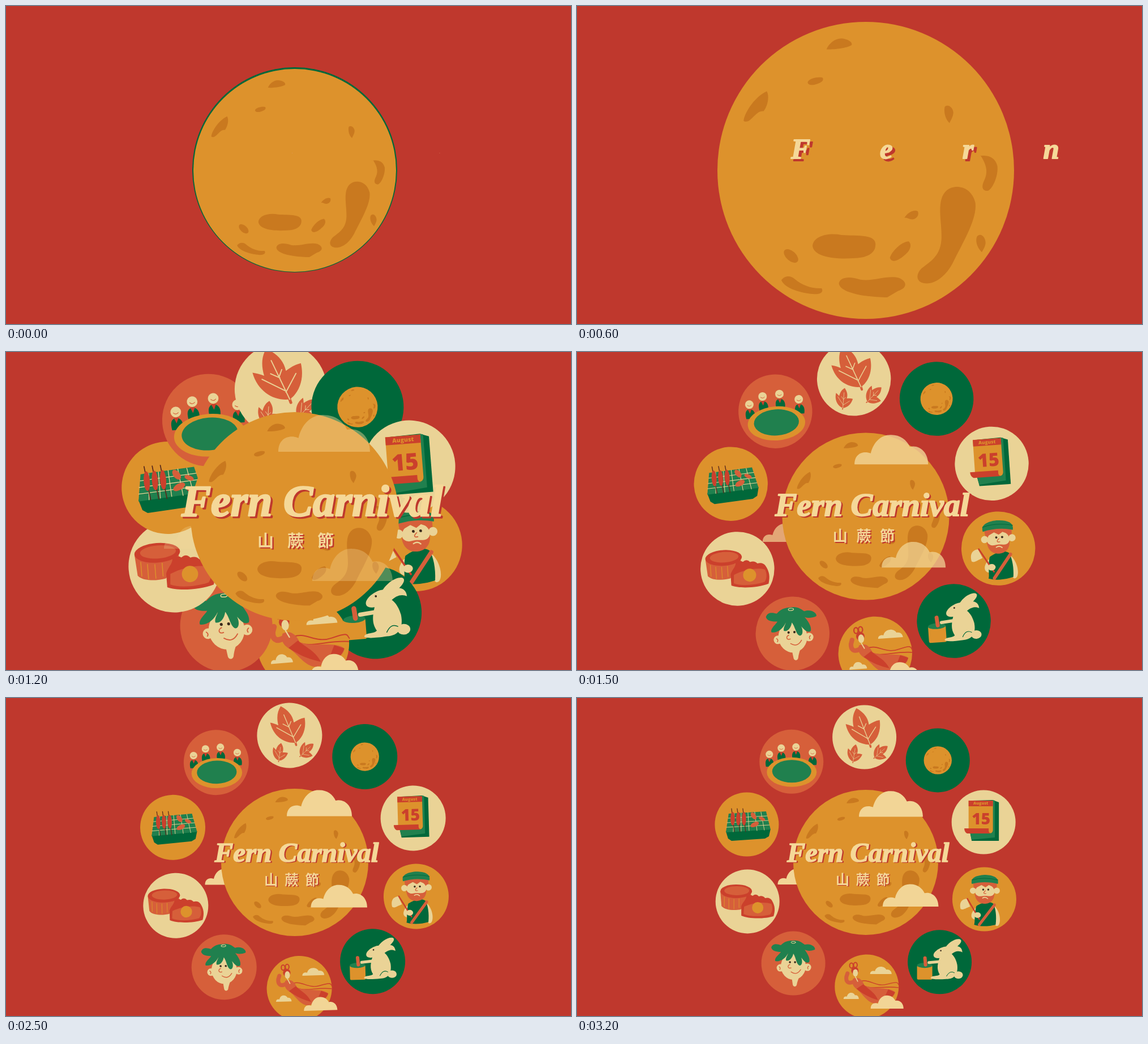
Animation of 998x561 px, one loop 3.3 s. Source, as an HTML page:

```html
<!DOCTYPE html>
<html lang="en">
<head>
<meta charset="utf-8">
<title>Fern Carnival</title>
<style>
  :root { --bg: #bf382d; --cream: #ead396; --orange: #dd922c; --dark: #00683a; --leaf: #20804e; --red: #cb402c; --coral: #d65f3a; }
  html, body { margin: 0; width: 100%; height: 100%; overflow: hidden; background: var(--bg); }
  svg { display: block; width: 100%; height: 100%; }
  .c { fill: var(--cream); } .o { fill: var(--orange); } .d { fill: var(--dark); }
  .l { fill: var(--leaf); } .r { fill: var(--red); } .k { fill: var(--coral); }
  .ln { fill: none; stroke-linecap: round; stroke-linejoin: round; }
  .sc { stroke: var(--cream); } .so { stroke: var(--orange); } .sd { stroke: var(--dark); }
  .sr { stroke: var(--red); } .sk { stroke: var(--coral); }
  .ink { fill: #3a2a1c; }
  .crater { fill: #c9791f; }
  .cloud { fill: #f2d596; }
  .word { font-family: "Liberation Serif", "Times New Roman", serif; font-weight: 700; font-style: italic; stroke-width: .035em; stroke-linejoin: round; white-space: pre; }
  .sub { font-family: "Noto Sans CJK TC", "Noto Sans CJK JP", "Noto Sans CJK", sans-serif; font-weight: 700; }
  .face { fill: #f5d898; stroke: #f5d898; }
  .shade { fill: var(--bg); stroke: var(--bg); }
  .sub text { stroke: none; }
  .num { font-family: "Open Sans", "Noto Sans", sans-serif; font-weight: 800; text-anchor: middle; }
</style>
</head>
<body>
<svg viewBox="0 0 998 561" preserveAspectRatio="none">
  <defs>
    <g id="moonArt">
      <circle class="o" cx="510" cy="290" r="276"/>
      <g class="crater">
        <path d="M437 65C442 53 456 41 472 46C480 48 485 52 484 57C478 62 452 66 437 65Z"/>
        <path d="M402 126C404 119 424 115 430 118C433 125 424 128 414 131C406 132 402 130 402 126Z"/>
        <path d="M283 196C286 180 305 152 326 143C331 152 328 170 320 180C308 178 300 195 290 199C285 200 282 199 283 196Z"/>
        <path d="M657 172C662 166 672 172 673 182C673 190 668 197 666 202C658 195 655 182 657 172Z"/>
        <path d="M717 264C730 261 750 261 755 282C757 300 746 325 737 328C728 328 725 322 729 312C738 295 736 282 724 263Z"/>
        <path d="M661 327C675 315 706 318 714 350C718 380 690 425 672 462C660 485 640 502 620 500C604 498 602 484 614 472C632 458 650 448 651 415C652 385 640 345 661 327Z"/>
        <path d="M717 413C724 405 733 414 733 425C732 433 728 438 726 442C716 432 714 420 717 413Z"/>
        <path d="M582 378C588 368 600 362 607 366C610 374 604 380 597 381C590 381 588 377 582 378Z"/>
        <path d="M411 430C413 412 440 405 465 410C490 412 525 408 528 425C530 443 515 452 490 453C450 456 413 450 411 430Z"/>
        <path d="M555 452C562 435 580 422 590 422C597 428 592 440 585 445C575 455 558 465 555 452Z"/>
        <ellipse cx="371" cy="449" rx="16" ry="9" transform="rotate(42 371 449)"/>
        <path d="M353 494C358 486 370 484 378 492C392 504 410 510 428 509C432 516 426 520 415 520C390 518 360 510 353 494Z"/>
        <path d="M460 500C462 488 480 486 500 493C525 497 550 484 572 490C590 498 585 510 570 514L550 526C520 526 462 520 460 500Z"/>
      </g>
    </g>
    <path id="puff" d="M0 0C0-15 12-19 22-15C26-32 38-41 50-40C62-40 71-33 75-24C88-27 100-17 100 0Z"/>
    <g id="leafArt">
      <path class="k" d="M10 13C-8 14-28 2-33-23C-28-22-23-20-19-18C-22-32-20-42-14-51C-2-44 6-36 8-22C14-26 20-29 27-30C30-10 22 6 10 13Z"/>
      <path class="ln sk" stroke-width="3.5" d="M9 10L11 17"/>
      <path class="ln sc" stroke-width="1.3" d="M10 13L-9-36M5 2L-22-14M6 4L20-18M0-14L-11-20M-1-15L3-24"/>
    </g>
    <g id="guest">
      <path class="d" d="M-6 22C-8 12-6 8 0 7C6 8 9 13 7 22Z"/>
      <path class="r" d="M-3 7H3L0 14Z"/>
      <circle class="c" r="6.5"/>
      <path class="ln sk" stroke-width=".8" d="M-3 1Q0 4 3 1"/>
    </g>
  </defs>

  <g id="ring">
    <!-- axeman -->
    <g class="bubble"><circle class="o" r="56.5"/>
      <path class="c" d="M-16 16C-24 24-26 34-16 36L-8 32L-6 14ZM18 12C28 22 30 40 25 46C20 50 18 44 18 38Z"/>
      <path class="d" d="M-14 12C-18 25-16 40-18 45C-6 49 8 48 20 45C22 30 20 16 16 8C8 2-4 6-14 12Z"/>
      <path class="ln sk" stroke-width="5" stroke-linecap="butt" d="M18 10L-9 45"/>
      <path class="c" d="M-31-1C-42 0-44 8-42 17C-38 20-34 16-25 13Z"/>
      <path class="ln sr" stroke-width="2.4" d="M-30-1L-9 35"/>
      <ellipse class="c" cx="-12" cy="28" rx="6" ry="5"/>
      <path class="k" d="M-20-30H22V-16H-18Z"/>
      <g class="c"><circle cx="-20" cy="-15" r="5.5"/><circle cx="22" cy="-15" r="5.5"/><ellipse cx="1" cy="-13" rx="17" ry="14"/></g>
      <path class="k" d="M-17-11C-10-2-6-6 1-6C8-6 14-3 18-11C18 4 8 8 1 8C-7 8-16 4-17-11ZM-18-29H20L15-22L8-25L2-21L-5-25L-13-21Z"/>
      <path class="ln sc" stroke-width="1.6" d="M-3-2Q2-5 6-1"/>
      <g class="ink"><circle cx="-2" cy="-17" r="1.7"/><circle cx="7" cy="-17" r="1.7"/></g>
      <path class="ln sk" stroke-width="1.2" d="M2-15C-2-12-2-9 3-10"/>
      <path class="l" d="M-22-27C-25-38-14-42 0-43C14-43 27-39 24-27C10-31-8-31-22-27Z"/>
      <path class="ln sd" stroke-width="1" d="M-22-34Q0-40 24-34"/>
    </g>
    <!-- rabbit -->
    <g class="bubble"><circle class="d" r="56.5"/>
      <rect class="o" x="-40" y="6" width="27" height="25" rx="2"/>
      <ellipse class="l" cx="-26.5" cy="6" rx="13.5" ry="4.5"/>
      <path class="ln sk" stroke-width="6" d="M-26-7L-25 5"/>
      <g class="c">
        <path d="M8-22C14-34 28-42 36-40C42-37 34-28 18-18ZM14-20C24-32 40-30 40-17C35-20 27-20 19-12Z"/>
        <ellipse cx="5" cy="-17" rx="17" ry="8.5" transform="rotate(-24 5 -17)"/>
        <path d="M2-14C18-24 28-10 31 5C33 22 26 30 12 30C-2 31-14 31-16 28C-14 23-4 26 0 22C-6 12-4 2 2-14Z"/>
        <ellipse cx="33" cy="23" rx="8" ry="6.5"/>
      </g>
      <path class="ln sc" stroke-width="5" d="M4-1L-19 1"/>
      <circle class="ink" cx="2" cy="-20" r="1.3"/>
      <path class="ln sd" stroke-width="1" d="M12 25Q18 14 26 19"/>
    </g>
    <!-- flying lady -->
    <g class="bubble"><circle class="o" r="56.5"/>
      <use href="#puff" class="c" transform="translate(6 -22) scale(.38 .32)"/>
      <use href="#puff" class="c" transform="translate(-41 22) scale(.27)"/>
      <path class="ln sr" stroke-width="1.4" d="M-14-8C4-16 14 2 36-4S54-6 57-2M-10-4C8 8 26-2 56 2"/>
      <path class="ln sk" stroke-width="7" d="M-24-8C-33-4-37-9-36-17L-34-23"/>
      <path class="k" d="M-24-14C-14-18-8-12-4-2C10 6 40 0 50 10C48 22 30 26 14 30C0 28-6 14-16 6C-22 2-28-4-24-14Z"/>
      <path class="r" d="M-18 4L-6-4C4 6 14 10 20 24C6 20-6 14-18 4ZM38 5L50 10C46 20 38 22 28 26Z"/>
      <circle class="r" cx="-21" cy="-28" r="6.5"/>
      <ellipse class="c" cx="-20" cy="-24" rx="4.5" ry="6.5"/>
      <g class="ln sr" stroke-width="2"><ellipse cx="-27" cy="-37" rx="3.2" ry="4.5"/><ellipse cx="-20" cy="-38" rx="3.2" ry="4.5"/></g>
      <path class="ln sc" stroke-width="1.6" d="M-20-17L-16-9"/>
      <use href="#puff" class="cloud" transform="translate(7 39) scale(.58)"/>
    </g>
    <!-- boy with pomelo hat -->
    <g class="bubble"><circle class="k" r="56.5"/>
      <g class="c">
        <path d="M-3 24L-1 38C0 42 5 42 6 38C7 32 9 28 11 22Z"/>
        <circle cx="-23" cy="8" r="6.5"/><circle cx="25" cy="7" r="6.5"/>
        <ellipse cx="0" cy="5" rx="22" ry="24"/>
      </g>
      <path class="ln sk" stroke-width="1.3" d="M-25 6Q-22 8-24 11M27 5Q24 7 26 10M-6 2C-11 4-10 10-4 8M-4 15Q6 22 13 11"/>
      <g class="ink"><circle cx="-6" cy="-2" r="1.8"/><circle cx="3" cy="-2" r="1.8"/></g>
      <path class="l" d="M-2-40C10-42 16-36 20-33C32-36 40-28 38-24C30-21 24-22 20-24C26-16 30-8 28-2C22 1 18-5 14-10C17-2 15 4 11 4C5 2 5-10 0-17C-2-8-8-3-13-5C-14-10-10-14-9-18C-14-8-24-2-32-4C-34-10-24-16-22-20C-30-20-38-22-39-28C-36-36-28-34-22-32C-16-38-10-40-2-40Z"/>
      <ellipse class="ln sc" cx="0" cy="-37" rx="4" ry="1.8" stroke-width="1"/>
    </g>
    <!-- cakes -->
    <g class="bubble"><circle class="c" r="56.5"/>
      <path class="k" d="M-48-18L-46 8C-40 16-22 16-12 14L6-2V-18Z"/>
      <path class="ln so" stroke-width="1" d="M-41-8V9M-33-5V13M-24-4V13M-15-5V11"/>
      <ellipse class="r" cx="-20" cy="-18" rx="28" ry="12"/>
      <ellipse class="k" cx="-19" cy="-19" rx="22" ry="8"/>
      <path class="r" d="M-11 8C-8 0-3-2-2-9Q4-14 9-10Q15-15 20-9Q27-11 31-6Q39-8 43-2C49 8 49 16 46 26C30 31 2 31-11 25Z"/>
      <path class="k" d="M-6 9C10 2 30 0 42 4C45 11 44 18 40 23C24 27 4 27-7 22Z"/>
      <circle class="o" cx="18" cy="11" r="10"/>
    </g>
    <!-- grill -->
    <g class="bubble"><circle class="o" r="56.5"/>
      <path class="d" d="M-37 12L42 8L39 21L32 25L-27 29L-33 25Z"/>
      <path class="l" d="M-32-19L34-23L42 9L-37 14Z"/>
      <path class="ln sc" stroke-width=".9" d="M-33-11L36-15M-35-3L38-7M-36 5L40 1M-22-19L-24 13M-10-20L-10 12M2-21L4 11M14-22L18 11M25-22L31 10"/>
      <path class="ln" stroke="#5a2a1c" stroke-width="1.2" d="M-27-28L-22 13M-17-28L-12 13M-7-28L-2 13"/>
      <g class="r"><ellipse cx="-25" cy="-10" rx="3.8" ry="12"/><ellipse cx="-15" cy="-10" rx="3.8" ry="12"/><ellipse cx="-5" cy="-10" rx="3.8" ry="12"/></g>
      <g class="k"><ellipse cx="12" cy="-15" rx="4" ry="7" transform="rotate(-35 12 -15)"/><ellipse cx="14" cy="0" rx="8" ry="4" transform="rotate(-25 14 0)"/><ellipse cx="27" cy="-10" rx="6" ry="3" transform="rotate(25 27 -10)"/></g>
    </g>
    <!-- dinner table -->
    <g class="bubble"><circle class="k" r="56.5"/>
      <use href="#guest" transform="translate(-39 -13)"/><use href="#guest" transform="translate(-18 -24)"/>
      <use href="#guest" transform="translate(8 -26)"/><use href="#guest" transform="translate(37 -16)"/>
      <ellipse class="o" cx=".5" cy="18.5" rx="44" ry="26"/>
      <ellipse class="l" cx=".5" cy="17" rx="34.5" ry="20"/>
    </g>
    <!-- leaves -->
    <g class="bubble"><circle class="c" r="56.5"/>
      <use href="#leafArt"/>
      <use href="#leafArt" transform="translate(-21 36) rotate(30) scale(.45)"/>
      <use href="#leafArt" transform="translate(22 30) rotate(69) scale(.45)"/>
    </g>
    <!-- little moon -->
    <g class="bubble"><circle class="d" r="56.5"/>
      <use href="#moonArt" transform="scale(.0895) translate(-510 -290)"/>
    </g>
    <!-- calendar -->
    <g class="bubble"><circle class="c" r="56.5"/>
      <path class="d" d="M-20-38L16-39L27-35V33H-21L-24 18Z"/>
      <path class="l" d="M16-39L20-38V27L-21 31L-24 18H16Z"/>
      <path class="o" d="M-26.5-38H16.5V14C16 20 12 20 8 19L-26.5 12Z"/>
      <path class="r" d="M-26.5-38H16.5V-28H-26.5ZM-34 11H9V15C9 18 11 20 14 20H-29C-33 18-34 14-34 11Z"/>
      <text class="num o" x="-5" y="-30.6" font-size="7.2">August</text>
      <text class="num r" x="-4.5" y="4" font-size="28">15</text>
    </g>
  </g>

  <use id="cloudBack" href="#puff" class="cloud"/>
  <circle id="rim" class="d" cx="510" cy="289" r="181"/>
  <use id="moon" href="#moonArt"/>
  <use id="cloudTop" href="#puff" class="cloud"/>
  <use id="cloudLow" href="#puff" class="cloud"/>
  <g id="title" class="word"><text class="shade">Fern Carnival</text><text class="face">Fern Carnival</text></g>
  <g id="sub" class="sub" lang="zh-Hant"><text class="shade">山蕨節</text><text class="face">山蕨節</text></g>
</svg>
<script>
  const LOOP = 3300, STEP = 100, REST = 17.46, UNIT = 56.5, OUT = 2.2;
  const $ = id => document.getElementById(id);
  const bubbles = [...document.querySelectorAll('.bubble')];

  // Keys are [time, value, easeOutPower]
  const track = (...keys) => t => {
    const i = keys.findIndex(k => k[0] > t);
    if (i === 0) return keys[0][1];
    if (i < 0) return keys[keys.length - 1][1];
    const [t0, a] = keys[i - 1], [t1, b, p = 1] = keys[i];
    return a + (b - a) * (1 - (1 - (t - t0) / (t1 - t0)) ** p);
  };
  // Values at 1200, 1900, 2500 and 3200 ms, after optional earlier keys
  const settle = (early, a, b, c, d) => track(...early, [1200, a], [1900, b, OUT], [2500, c], [3200, d]);

  const moonR = settle([[0, 179], [100, 255], [200, 283], [300, 276], [600, 262], [900, 230.5]], 184, 132.5, 130, 128);
  const ring = {
    x: settle([], 505, 509.2, 509.5, 509.7),
    y: settle([], 290, 289.5, 289.2, 289),
    turn: track([900, 12.4], [1200, 13], [1900, 14.3], [2500, 15.8], [3200, REST]),
    reach: track([900, 110], [1000, 140], [1100, 184], [1200, 225], [1300, 243], [1400, 246], [1500, 243],
      [1800, 230], [1900, 227.2], [2500, 223.4], [3200, 219.9]),
    size: settle([[0, 0], [900, 84]], 81.5, 58.5, 57.5, 56.5)
  };
  const title = {
    size: settle([[0, 1], [300, 22], [900, 80]], 78, 49.8, 49, 48.4),
    gap: settle([[0, 260], [300, 203], [900, 43]], 0, 0, 0, 0),
    x: settle([[0, 505], [300, 457], [900, 299]], 310, 366, 368.5, 371),
    y: settle([[0, 260], [300, 252], [900, 285]], 289, 288.5, 288.5, 288.5),
    drop: settle([[0, 0], [300, 5.5], [900, 4]], 3.4, 2.3, 2.2, 2.2)
  };
  const sub = {
    size: settle([[600, 0], [900, 13]], 29, 25, 24.5, 24),
    gap: settle([[600, 78], [900, 60]], 24, 12, 11.8, 11.7),
    x: settle([[600, 490], [900, 468]], 444, 455, 456, 457),
    y: settle([[600, 346], [900, 346]], 344, 330.5, 329.5, 328.5),
    drop: settle([[600, 0], [900, 3.5]], 2.5, 1.8, 1.7, 1.7)
  };
  const clouds = {
    cloudTop: {
      x: settle([[900, 470]], 481, 494, 496, 498),
      y: settle([[900, 149]], 176, 207.5, 208.5, 209.5),
      w: settle([[900, 201]], 162, 117, 115, 113),
      show: track([800, 0], [900, .1], [1200, .45], [1650, 1])
    },
    cloudLow: {
      x: settle([[900, 546]], 541, 537, 538.5, 540),
      y: settle([[900, 440]], 404, 370.5, 369.5, 368),
      w: settle([[900, 180]], 142, 101, 99.5, 98.5),
      show: track([900, 0], [1200, .33], [1700, 1])
    },
    cloudBack: {
      x: settle([[900, 200]], 279, 348, 351.5, 354.5),
      y: settle([[900, 365]], 347, 330, 329.5, 329),
      w: settle([[900, 120]], 100, 71, 70, 69),
      show: track([1000, 0], [1200, .25], [1700, 1])
    }
  };

  function drawText(id, k, t) {
    const drop = k.drop(t);
    const group = $(id);
    group.style.fontSize = k.size(t) + 'px';
    group.style.letterSpacing = k.gap(t) + 'px';
    group.style.display = k.size(t) > .5 ? '' : 'none';
    [...group.children].forEach((line, i) => {
      line.setAttribute('x', k.x(t) + (i ? 0 : drop));
      line.setAttribute('y', k.y(t) + (i ? 0 : drop * .85));
    });
  }

  function draw(t) {
    $('moon').setAttribute('transform', `translate(510 290) scale(${moonR(t) / 276}) translate(-510 -290)`);
    $('rim').style.display = t < STEP ? '' : 'none';

    $('ring').setAttribute('transform', `translate(${ring.x(t)} ${ring.y(t)}) rotate(${ring.turn(t) - REST})`);
    const reach = ring.reach(t), scale = ring.size(t) / UNIT;
    bubbles.forEach((b, i) => {
      const a = (REST + 36 * i) * Math.PI / 180;
      b.setAttribute('transform', `translate(${reach * Math.cos(a)} ${reach * Math.sin(a)}) scale(${scale})`);
    });

    for (const id in clouds) {
      const c = clouds[id];
      $(id).setAttribute('transform', `translate(${c.x(t)} ${c.y(t)}) scale(${c.w(t) / 100})`);
      $(id).style.opacity = c.show(t);
    }
    drawText('title', title, t);
    drawText('sub', sub, t);
  }

  const start = performance.now();
  function tick() {
    const t = (performance.now() - start) % LOOP;
    draw(Math.floor(t / STEP) * STEP);
    requestAnimationFrame(tick);
  }
  tick();
</script>
</body>
</html>
```
